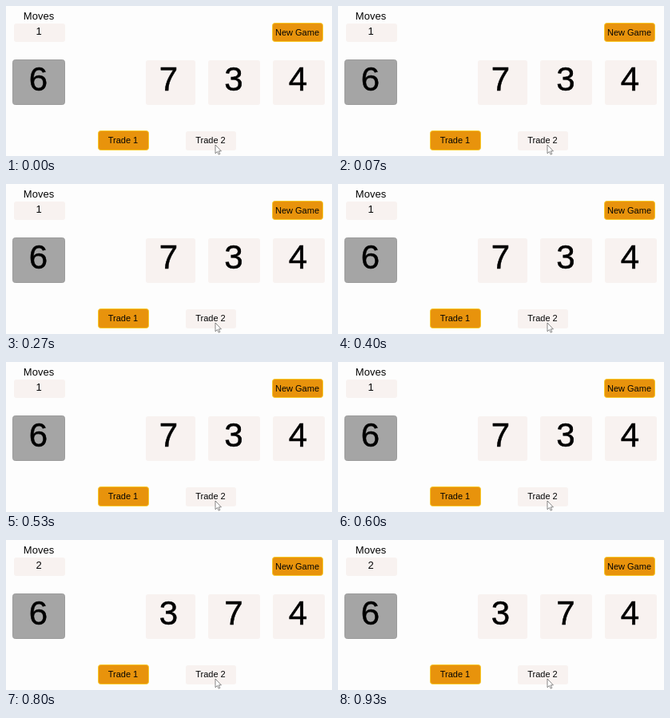
An HTML page for the animation above (0.99 s loop, 408x188 px).

```html
<!DOCTYPE html>
<html lang="en">
<head>
<meta charset="utf-8">
<title>Number trading game</title>
<style>
  html, body { margin: 0; width: 100%; height: 100%; overflow: hidden; background: #fdfdfd; }
  svg { display: block; width: 408px; height: 188px; }
  text { font-family: "Liberation Sans", Arial, sans-serif; text-anchor: middle; fill: #050505; }
  .label { font-size: 13px; }
  .small { font-size: 11px; }
  .digit { font-size: 42px; fill: #000; stroke: #000; stroke-width: 0.5px; }
  .pale { fill: #f8f2f0; }
  .held { fill: #a5a5a5; stroke: #9c9c9c; }
  .active { fill: #e8930c; stroke: #f8c826; }
</style>
</head>
<body>
<svg id="stage" viewBox="0 0 408 188"></svg>
<script>
const LOOP = 990, SWAP = 730;
const stage = document.getElementById('stage');

function add(tag, attrs, text = '') {
  const el = document.createElementNS('http://www.w3.org/2000/svg', tag);
  for (const key in attrs) el.setAttribute(key, attrs[key]);
  el.textContent = text;
  return stage.appendChild(el);
}

function box(x, y, width, height, cls) {
  return add('rect', { x, y, width, height, rx: 3, class: cls });
}

function label(x, y, cls, text) {
  return add('text', { x, y, class: cls }, text);
}

label(41, 17, 'label', 'Moves');
box(10, 22, 64, 23, 'pale');
const moves = label(41, 36, 'label', '1');

box(333.5, 21.5, 63, 23, 'active');
label(364.5, 37, 'small', 'New Game');

box(8.5, 67.5, 65, 56, 'held');
label(40.5, 105.5, 'digit', '6');

const cards = [[175, 62, 203.5], [253, 65, 285], [334, 65, 365.5]].map(([x, width, mid]) => {
  box(x, 68, width, 56, 'pale');
  return label(mid, 105.5, 'digit', '');
});

box(115.5, 156.5, 63, 24, 'active');
label(146.5, 172, 'small', 'Trade 1');
box(225, 157, 63, 24, 'pale');
label(256, 172, 'small', 'Trade 2');

// Mouse pointer
add('path', {
  d: 'M262 174V184.8L264.5 182.5L266.2 186.2L267.8 185.4L266.2 181.9H269.4Z',
  fill: '#fff', stroke: '#555', 'stroke-width': 0.7
});

function draw(time) {
  const traded = time % LOOP >= SWAP;
  moves.textContent = traded ? '2' : '1';
  const order = traded ? '374' : '734';
  cards.forEach((card, i) => { card.textContent = order[i]; });
}

const start = performance.now();
function tick() {
  draw(performance.now() - start);
  requestAnimationFrame(tick);
}
tick();
</script>
</body>
</html>
```
